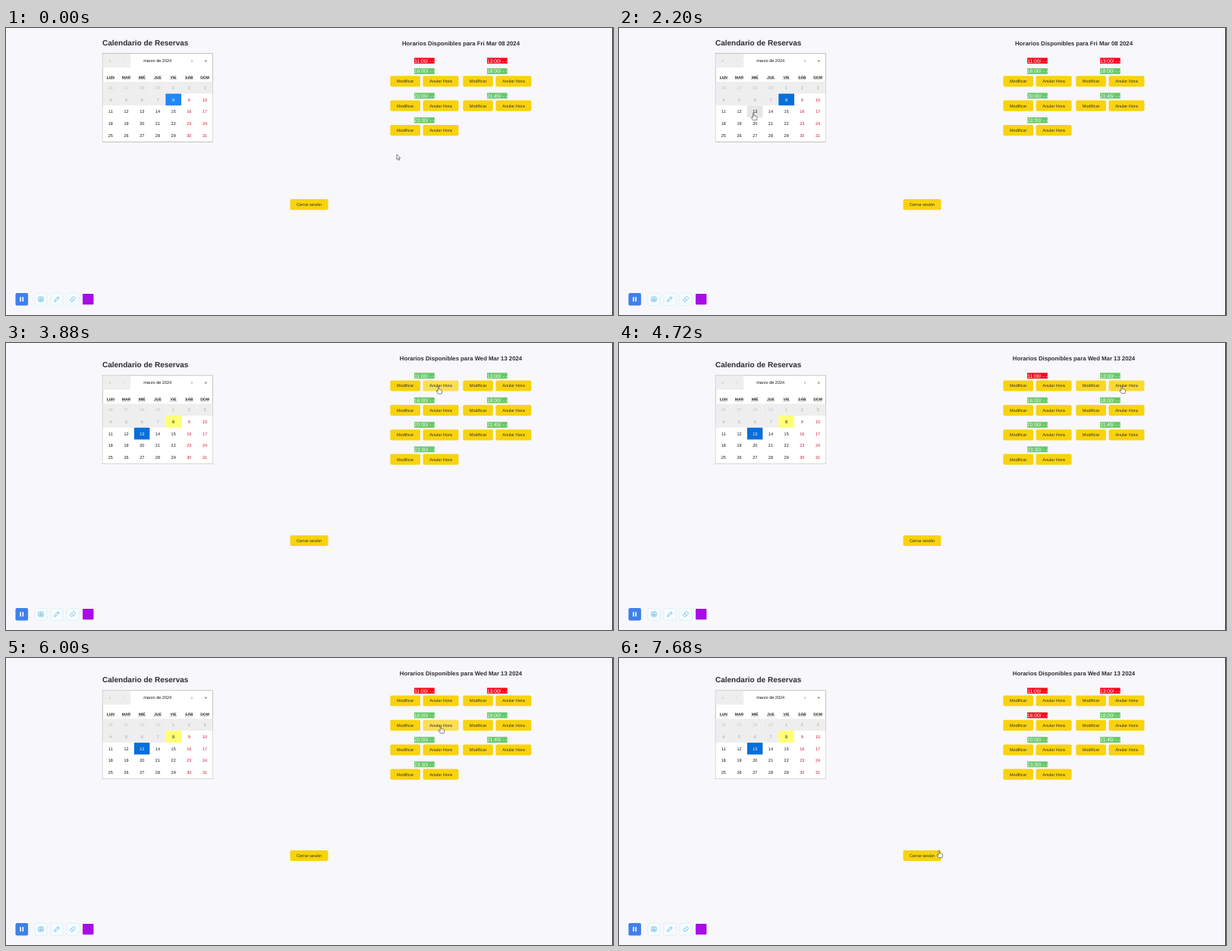
Write an HTML page that moves like this. It is 800 px wide and 379 px high and loops after 8000 ms.

```html
<!DOCTYPE html>
<html lang="es">
<head>
<meta charset="utf-8">
<title>Calendario de Reservas</title>
<style>
  html, body { margin: 0; width: 100%; height: 100%; overflow: hidden; background: #f8f7fb; }
  svg { display: block; width: 800px; height: 379px; }
  text { font-family: "Liberation Sans", Arial, sans-serif; text-rendering: geometricPrecision; white-space: pre; }
</style>
</head>
<body>
<svg id="stage" viewBox="0 0 800 379"></svg>
<script>
const LOOP = 8000;
const PRESS = 2200, PICK = 2360, BLUR = 3880;
const stage = document.getElementById('stage');

function el(parent, tag, attrs, content) {
  const node = document.createElementNS('http://www.w3.org/2000/svg', tag);
  for (const key in attrs) node.setAttribute(key, attrs[key]);
  if (content !== undefined) node.textContent = content;
  parent.appendChild(node);
  return node;
}
const group = parent => el(parent, 'g', {});
const rect = (parent, x, y, width, height, fill, rx = 0) =>
  el(parent, 'rect', { x, y, width, height, fill, rx });
const label = (parent, x, y, size, fill, content, extra = {}) =>
  el(parent, 'text', { x, y, fill, 'font-size': size, 'text-anchor': 'middle', ...extra }, content);
const show = (node, on) => node.setAttribute('visibility', on ? 'inherit' : 'hidden');
const bold = { 'font-weight': 700 };

rect(stage, 799, 0, 1, 379, '#25252a');

// Calendar
const cal = group(stage);
const LEFT = 127.5, COL = 20.7, TOP = 70.9, ROW = 15.82;
label(cal, 127, 22.7, 10, '#2b2d33', 'Calendario de Reservas', { ...bold, 'text-anchor': 'start' });
el(cal, 'rect', { x: 127.2, y: 33.6, width: 145.3, height: 116.8, fill: '#fff', stroke: '#a0a096', 'stroke-width': 0.6 });
rect(cal, LEFT, 34, 36.6, 18.2, '#efeeee');
[['«', 136.7, '#b5b5b5'], ['‹', 155, '#b5b5b5'], ['›', 244.9, '#111'], ['»', 263.2, '#111']]
  .forEach(([mark, x, fill]) => label(cal, x, 44.7, 5.54, fill, mark));
label(cal, 199.7, 44.8, 5.54, '#111', 'marzo de 2024');
['LUN', 'MAR', 'MIÉ', 'JUE', 'VIE', 'SÁB', 'DOM'].forEach((day, i) => {
  const x = LEFT + COL * (i + 0.5);
  label(cal, x, 66.8, 5, '#222', day, bold);
  el(cal, 'path', { d: `M${x - 5.2} 67.8h10.4`, stroke: '#444', 'stroke-width': 0.5, 'stroke-dasharray': '0.8 0.5' });
});

const tiles = [];
for (let i = 0; i < 35; i++) {
  const day = i < 4 ? 26 + i : i - 3;
  const col = i % 7, x = LEFT + col * COL, y = TOP + Math.floor(i / 7) * ROW;
  const off = i < 11;
  const ink = i < 4 ? '#c3c3c3' : off ? '#a3a3a3' : col > 4 ? '#c9182a' : '#111';
  tiles.push({
    day, x, y, w: COL, h: ROW, off, ink,
    box: rect(cal, x, y, COL, ROW, '#fff'),
    text: label(cal, x + COL / 2, y + ROW / 2 + 1.9, 5.54, ink, day)
  });
}

// Time slots
const GOLD = [248, 211, 14], PALE = [251, 222, 83];
const mix = f => `rgb(${GOLD.map((c, i) => Math.round(c + (PALE[i] - c) * f))})`;

function button(parent, x, y, w, caption) {
  const box = rect(parent, x, y, w, 14.2, mix(0), 2);
  label(parent, x + w / 2, y + 9, 5.54, '#333126', caption);
  return { x, y, w, h: 14.2, box };
}
function slot(parent, list, time, col, y, withButtons) {
  const x = 506.4 + col * 95.9, mid = x + 45;
  const bg = rect(parent, mid - 13.3, y - 3.8, 26.7, 7.6, '#66c866');
  label(parent, mid, y + 2.4, 6.65, '#fff', time + '/ - -');
  if (withButtons) {
    list.push(button(parent, x, y + 6.2, 39.6, 'Modificar'),
              button(parent, x + 43.2, y + 6.2, 46.9, 'Anular Hora'));
  }
  return bg;
}
function panel(date) {
  const node = group(stage);
  label(node, 599.5, 23.1, 7.78, '#2b2d33', 'Horarios Disponibles para ' + date, bold);
  return { node, buttons: [], slots: [] };
}
const times = ['11:00', '13:00', '16:00', '18:00', '20:00', '21:45', '23:30'];
const RED = '#f3081c', GREEN = '#66c866';
const first = panel('Fri Mar 08 2024');
const second = panel('Wed Mar 13 2024');
times.forEach((time, i) => {
  const row = Math.floor(i / 2), col = i % 2;
  const yA = row ? 57 + (row - 1) * 32.4 : 43.2;
  first.slots.push(slot(first.node, first.buttons, time, col, yA, row > 0));
  second.slots.push(slot(second.node, second.buttons, time, col, 43.2 + row * 32.4, true));
});
first.slots[0].setAttribute('fill', RED);
first.slots[1].setAttribute('fill', RED);
const cancelled = [4040, 5080, 6120];

const logout = group(stage);
const exit = button(logout, 374.5, 226, 50, 'Cerrar sesión');

// Recorder toolbar
rect(stage, 12.5, 350, 16.6, 16.4, '#3f80ec', 2);
rect(stage, 18.3, 355.2, 1.6, 6, '#fff');
rect(stage, 21.5, 355.2, 1.6, 6, '#fff');
const line = { fill: 'none', stroke: '#58b4e2', 'stroke-width': 0.8, 'stroke-linejoin': 'round' };
[46, 67, 88].forEach(x =>
  el(stage, 'rect', { x: x - 8, y: 350.3, width: 16, height: 16, rx: 1.8, fill: '#f5fcff', stroke: '#d3e8f2', 'stroke-width': 0.6 }));
el(stage, 'path', { ...line, d: 'M42.8 356.2q0-1.2 1.2-1.2h4q1.2 0 1.2 1.2v3.8q0 1.2-1.2 1.2h-4q-1.2 0-1.2-1.2zM44.3 358.3h3.4v1.2h-3.4zM44.5 356.7h3' });
el(stage, 'path', { ...line, d: 'M63.8 361.2l.6-2.2 4.2-4.2 1.6 1.6-4.2 4.2zM67.6 355.8l1.6 1.6' });
el(stage, 'path', { ...line, d: 'M84.3 359.2l4.3-4.3q.6-.6 1.2 0l1.4 1.4q.6.6 0 1.2l-3.7 3.7h-1.4l-1.8-1.8zM86.4 357.1l2.8 2.8' });
rect(stage, 101, 351, 14.4, 14.2, '#a90ce8', 1);

// Pointer
const ink = { fill: '#fff', stroke: '#33333a', 'stroke-width': 0.6, 'stroke-linejoin': 'round' };
const pointer = group(stage);
const arrow = el(pointer, 'path', { ...ink, d: 'M0 0V6.6L1.5 5.2 2.6 7.7 3.7 7.2 2.7 4.8H4.8Z' });
const hand = el(pointer, 'path', { ...ink,
  d: 'M-.7.5Q0-.4.7.5V3.6L2.3 3.9 4.1 4.4Q5 4.8 4.9 5.8L4.2 9.4H-.6L-2.8 6.2Q-3 5 -1.9 5.3L-.7 6.2Z' });

const path = [
  [0, 515, 167], [40, 515, 167], [280, 432, 150], [640, 432, 150], [720, 393, 134.5],
  [1040, 300, 128], [1280, 300, 128], [1680, 177.2, 112.3], [2720, 177.2, 112.3],
  [3520, 556, 63], [3880, 570, 57.6], [4240, 570, 57.6], [4800, 668, 57], [5400, 668, 57],
  [5480, 617.3, 71], [5880, 573, 90], [6400, 573, 90], [6800, 604, 163],
  [7200, 540, 205], [7680, 421.8, 254.3], [LOOP, 421.8, 254.3]
];
const still = (a, b) => !a || !b || (a[1] === b[1] && a[2] === b[2]);
function slope(i, k) {
  const a = path[i - 1], p = path[i], b = path[i + 1];
  if (still(a, p) || still(p, b)) return 0;
  return (b[k] - a[k]) / (b[0] - a[0]);
}
function pointerAt(t) {
  t = Math.max(0, t);
  let i = 0;
  while (i < path.length - 2 && path[i + 1][0] <= t) i++;
  const a = path[i], b = path[i + 1], span = b[0] - a[0];
  const u = (t - a[0]) / span, v = 1 - u;
  const axis = k => a[k] * v * v * (1 + 2 * u) + b[k] * u * u * (3 - 2 * u) +
    span * u * v * (v * slope(i, k) - u * slope(i + 1, k));
  return { x: axis(1), y: axis(2) };
}
const inside = (p, r, dy = 0) =>
  p.x >= r.x && p.x < r.x + r.w && p.y >= r.y + dy && p.y < r.y + dy + r.h;

function tileFill(tile, t, over) {
  const picked = t >= PICK;
  if (tile.day === (picked ? 13 : 8) && tile !== tiles[0]) {
    const focused = picked ? t < BLUR : t < PRESS;
    return focused || over ? '#1f88f8' : '#086fda';
  }
  if (tile.off) return '#efeeee';
  if (tile.day === 8) return over ? '#ffffa9' : '#ffff76';
  return over ? '#e6e6e6' : '#fff';
}

function draw(t) {
  const picked = t >= PICK, calShift = picked ? 9.3 : 0, exitShift = picked ? 27.9 : 0;
  const p = pointerAt(t);
  const trail = Array.from({ length: 9 }, (_, i) => pointerAt(t - i * 20));
  let link = inside(p, exit, exitShift);

  cal.setAttribute('transform', `translate(0 ${calShift})`);
  logout.setAttribute('transform', `translate(0 ${exitShift})`);
  show(first.node, !picked);
  show(second.node, picked);

  for (const tile of tiles) {
    const over = !tile.off && inside(p, tile, calShift);
    const fill = tileFill(tile, t, over);
    link = link || over;
    tile.box.setAttribute('fill', fill);
    tile.text.setAttribute('fill', fill === '#1f88f8' || fill === '#086fda' ? '#fff' : tile.ink);
  }
  for (const b of (picked ? second : first).buttons) {
    link = link || inside(p, b);
    const lit = trail.filter(q => inside(q, b)).length / trail.length;
    b.box.setAttribute('fill', mix(lit));
  }
  second.slots.forEach((bg, i) => bg.setAttribute('fill', t >= cancelled[i] ? RED : GREEN));

  pointer.setAttribute('transform', `translate(${p.x} ${p.y})`);
  show(arrow, !link);
  show(hand, link);
}

const start = performance.now();
function tick() {
  draw((performance.now() - start) % LOOP);
  requestAnimationFrame(tick);
}
tick();
</script>
</body>
</html>
```
